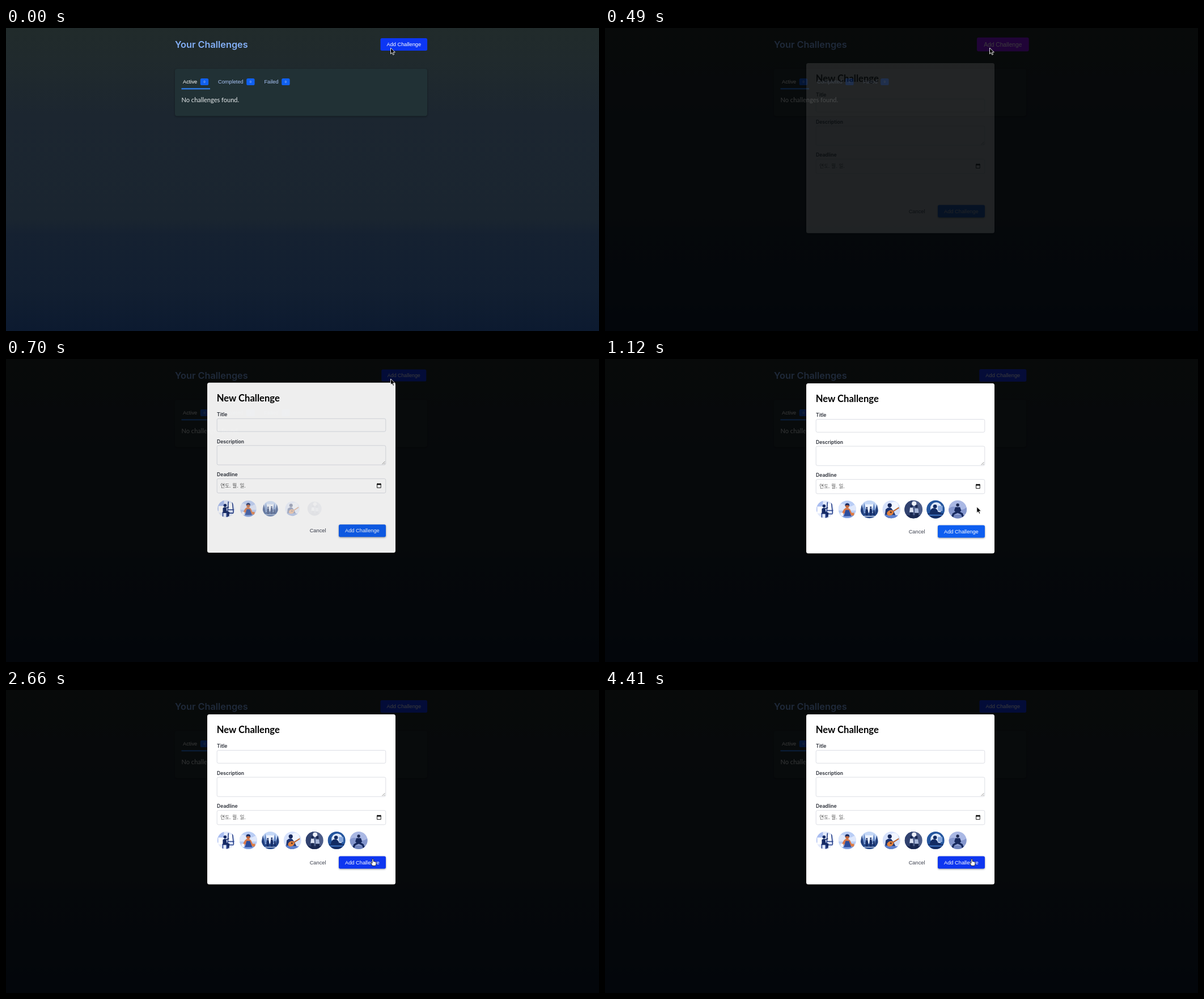
An HTML page for the animation above (4.62 s loop, 1046x535 px).

```html
<!DOCTYPE html>
<html lang="en">
<head>
<meta charset="utf-8">
<title>Your Challenges</title>
<style>
  html, body { margin: 0; width: 100%; height: 100%; overflow: hidden; background: #0c1a2f; }
  svg { display: block; width: 1046px; height: 535px; }
  text { font: 9.25px "Liberation Sans", Arial, sans-serif; white-space: pre; }
  .mid { text-anchor: middle; }
  .round { font: 600 8.65px Inter, sans-serif; fill: #2b2f38; }
  .head { font-size: 16.3px; fill: #84b0f7; }
  .lato { font: 11.05px Lato, sans-serif; fill: #e6eaec; }
  .big { font-size: 16.6px; font-weight: 700; fill: #000; }
  .date text { font: 8.6px "Noto Sans CJK KR", "Noto Sans CJK", sans-serif; fill: #555; }
  .badge { font-size: 5.6px; fill: #c3d3f8; }
  .field rect { fill: #fff0; stroke: #d3d6de; stroke-width: .8; }
  .lift { filter: drop-shadow(0 1px 1.5px #0006); }
</style>
</head>
<body>
<svg viewBox="0 0 1046 535">
  <defs>
    <linearGradient id="sky" x2="0" y2="1">
      <stop offset="0" stop-color="#212b2b"/>
      <stop offset=".11" stop-color="#202a2d"/>
      <stop offset=".29" stop-color="#1c2630"/>
      <stop offset=".63" stop-color="#1a2530"/>
      <stop offset=".68" stop-color="#152131"/>
      <stop offset=".86" stop-color="#121f31"/>
      <stop offset="1" stop-color="#0c1a30"/>
    </linearGradient>
    <clipPath id="disc"><circle r="15.5"/></clipPath>
  </defs>

  <rect width="1046" height="535" fill="url(#sky)"/>
  <text class="round head" x="298" y="34.7">Your Challenges</text>
  <g id="opener">
    <rect id="openerBox" x="-41.3" y="-11" width="82.6" height="22" rx="2.7"/>
    <text class="mid" y="3.2" fill="#fff">Add Challenge</text>
  </g>
  <rect class="lift" x="298" y="72" width="445" height="83.5" rx="4" fill="#213135"/>
  <g id="tabs"></g>
  <rect x="309.5" y="106.2" width="50.5" height="2.2" fill="#2e7ff0"/>
  <text class="lato" x="309.5" y="130.7">No challenges found.</text>

  <rect id="backdrop" width="1046" height="535" fill="#000" opacity=".77"/>

  <g id="modal">
    <rect class="lift" x="355" y="43" width="332" height="300.3" rx="3.5" fill="#fff"/>
    <text class="lato big" x="371.8" y="75.9">New Challenge</text>
    <text class="round" x="372" y="102.2">Title</text>
    <g class="field"><rect x="372.2" y="106.5" width="297.6" height="22.8" rx="2.5"/></g>
    <text class="round" x="372" y="149.8">Description</text>
    <g class="field">
      <rect x="372.2" y="154" width="297.6" height="34.2" rx="2.5"/>
      <path d="M663.5 187l5-5M666.5 187l2-2" stroke="#666" stroke-width=".7"/>
    </g>
    <text class="round" x="372" y="208.4">Deadline</text>
    <g class="field date">
      <rect x="372.2" y="212.6" width="297.6" height="25.2" rx="2.5"/>
      <text x="378.3" y="228.4">연도.</text><text x="399.3" y="228.4">월.</text><text x="412.4" y="228.4">일.</text>
      <path d="M654.6 222h6.6v6.6h-6.6z" fill="none" stroke="#000" stroke-width=".9"/>
      <path d="M654.2 221.3h7.4v2.2h-7.4zM655.5 220.4h1.2v1.5h-1.2zM659.2 220.4h1.2v1.5h-1.2z"/>
    </g>

    <g class="pic">
      <path fill="#e3eafc" d="M-16-16h32v32h-32z"/>
      <path fill="#a9bdf0" d="M-16-16h12v20h-12z"/>
      <path fill="#fff" d="M-14-5h11v12h-11zM3-10h9v11h-9z"/>
      <path fill="none" stroke="#203a86" stroke-width="1.6" d="M4-13l-2 28M11-13l3 28M2 2h12M3 8h11M-7 7h10M-6 7v8M1 7v8"/>
      <path fill="#152a66" d="M-6-1q3-3 6-1l1 6 5 2-1 8h-2l-1-6-8 0z"/>
      <circle cx="-2" cy="-6" r="2.8" fill="#152a66"/>
      <path stroke="#152a66" stroke-width="1.5" d="M-1-1l6-2"/>
    </g>
    <g class="pic">
      <path fill="#b9cdf5" d="M-16-16h32v32h-32z"/>
      <path fill="#dfe8fc" d="M-16-7q7-6 12 0t20-3v12h-32z"/>
      <path fill="#7e9ee0" d="M-16 9h32v7h-32z"/>
      <path fill="#d9784a" d="M-6 0q5-6 11 0l4 9-3 1-3-4v5h-7v-5l-4 4-3-1z"/>
      <path fill="#2c4c9c" d="M-3 1h6l4 11h-13z"/>
      <circle cy="-6" r="3.4" fill="#c4683d"/>
      <path fill="#1c2d62" d="M-4-6q0-5 4-5t4 5q-4-3-8 0z"/>
      <path fill="#f4f6ff" d="M-12 6h5v6h-5z"/>
      <path fill="#e07d44" d="M7 6h5v5h-5z"/>
    </g>
    <g class="pic">
      <path fill="#c4d7f6" d="M-16-16h32v32h-32z"/>
      <path fill="#eef4ff" d="M-7-9h14v14h-14z"/>
      <path fill="#6d8fc9" d="M-9-12l4 18h-8zM8-11l4 16h-8z"/>
      <path fill="#213f7d" d="M-13-9l4 18h-8zM13-9l4 18h-8z"/>
      <path fill="#274a8b" d="M-16 8q16-4 32 0v8h-32z"/>
      <path fill="#172f69" d="M-6-1h3l1 6-1 6h-3l-1-6zM1-2h3l1 6-1 8h-3l-1-7zM7 1h2l1 9h-4z"/>
      <path fill="#172f69" d="M-5.8-4h2.6v2.6h-2.6zM1.2-5h2.6v2.6h-2.6z"/>
      <path stroke="#dce8fb" stroke-width="1" d="M-11 12h22"/>
    </g>
    <g class="pic">
      <path fill="#d6e1fb" d="M-16-16h32v32h-32z"/>
      <circle cx="5" cy="-6" r="7" fill="#f2f6ff"/>
      <path fill="#1d3573" d="M-10 0q5-5 10-2l4 6 4 8-8 4h-12z"/>
      <circle cx="-3" cy="-7" r="3.6" fill="#15265a"/>
      <path fill="#5e80ce" d="M-13 9q14 0 26 2v6h-26z"/>
      <ellipse cx="-2" cy="6" rx="6" ry="4.5" fill="#e0813f" transform="rotate(-25 -2 6)"/>
      <path stroke="#c0622b" stroke-width="2" d="M2 4l11-7"/>
      <circle cx="-1" cy="5" r="1.5" fill="#53302c"/>
    </g>
    <g class="pic">
      <path fill="#4c5c88" d="M-16-16h32v32h-32z"/>
      <path fill="#31426f" d="M-16-16h14v32h-14z"/>
      <circle cx="1" cy="-10" r="4" fill="#edf0f8"/>
      <path fill="#1c2b55" d="M-16 10h32v6h-32z"/>
      <path fill="#dbe2f3" d="M-6-3h5l1 8h-7z"/>
      <path fill="#17264f" d="M-6 5h5v10h-5zM3-3h5l1 9-1 9h-5l-1-9z"/>
      <path fill="#a8b7da" d="M2-2h6l1 8h-7z"/>
      <circle cx="-3.5" cy="-5.5" r="2.4" fill="#192852"/>
      <circle cx="5" cy="-5.5" r="2.4" fill="#192852"/>
    </g>
    <g class="pic">
      <path fill="#24569f" d="M-16-16h32v32h-32z"/>
      <circle cx="1" cy="-2" r="10" fill="#dfe9fb"/>
      <path fill="#88a8dc" d="M4-6h8v9h-8z"/>
      <path fill="#122b63" d="M-10 5q2-8 8-7 5 1 6 6l5 1v2h-19zM-16 7h32v9h-32z"/>
      <circle cx="-1" cy="-5" r="3.3" fill="#122b63"/>
      <path fill="#3f74c2" d="M-12 9h24v2h-24z"/>
    </g>
    <g class="pic">
      <path fill="#aab8e4" d="M-16-16h32v32h-32z"/>
      <path fill="#8496cd" d="M-16-1q8-7 15-1t17-2v12h-32z"/>
      <path fill="#6f83bd" d="M-16 9h32v7h-32z"/>
      <path fill="#17295e" d="M-4-4h8l2 6-2 2 5 3 2 7h-3l-2-5-6-3-6 3-2 5h-3l2-7 5-3-2-2z"/>
      <circle cy="-7.5" r="2.7" fill="#1b2852"/>
    </g>

    <text x="535.7" y="307.7" fill="#3b3f4d">Cancel</text>
    <rect id="submit" class="lift" x="587" y="293.5" width="83" height="22" rx="2.7"/>
    <text class="mid" x="628.4" y="307.7" fill="#fff">Add Challenge</text>
  </g>

  <circle id="ring" cx="647.5" cy="298" r="21.5" fill="none" stroke="#222" stroke-width="1.2" opacity=".6"/>
  <g id="pointer">
    <path id="arrow" d="M0 0V10.8L2.5 8.5 4.3 12.4 6.1 11.6 4.4 7.8H7.8Z" stroke="#fff" stroke-width=".9"/>
    <path id="hand" d="M-1.1 1.2Q-1 0 0 0T1.1 1.2V4.4Q2.2 3.6 2.9 4.8 4 4.2 4.6 5.4 6 5 6 6.6 6 9.6 4.9 12H-.8Q-1.6 10-3.2 8-3.6 6.6-2.4 6.7L-1.1 7.8Z" fill="#fff" stroke="#000" stroke-width=".8"/>
  </g>
</svg>
<script>
const LOOP = 4620, STEP = 70, CLICKS = [2170, 3990], PRESS = 140;
const $ = id => document.getElementById(id);
const all = sel => [...document.querySelectorAll(sel)];
const clamp = v => Math.max(0, Math.min(1, v));
const show = (id, on) => $(id).setAttribute('visibility', on ? 'visible' : 'hidden');
const move = (el, x, y, s = 1) => el.setAttribute('transform', `translate(${x} ${y}) scale(${s})`);
const mix = (a, b, p) => `rgb(${a.map((v, i) => Math.round(v + (b[i] - v) * p))})`;
const fade = (ms, length) => Math.sin(clamp(ms / length) * Math.PI / 2);

// Damped spring from 0 to 1; w is the natural frequency, z the damping ratio
function spring(ms, w, z) {
  if (ms <= 0) return 0;
  const t = ms / 1000, r = Math.sqrt(1 - z * z), a = w * r * t;
  return 1 - Math.exp(-z * w * t) * (Math.cos(a) + z / r * Math.sin(a));
}

$('tabs').innerHTML = [['Active', 312, 350, '#fff'], ['Completed', 374, 431.4, '#a9c4f7'], ['Failed', 455.4, 493.4, '#a9c4f7']]
  .map(([name, x, bx, color]) => `<text x="${x}" y="98.2" fill="${color}">${name}</text>
    <rect x="${bx - 7.2}" y="89" width="14.4" height="12" rx="2.6" fill="#1060f0"/>
    <text class="mid badge" x="${bx}" y="97">0</text>`).join('');

const pics = all('.pic'), fields = all('.field');
pics.forEach(p => p.setAttribute('clip-path', 'url(#disc)'));

const PATH = [[930, 678.5, 35], [1120, 655.8, 261], [1450, 649, 299], [1900, 647, 298.3]];
function pointerAt(t) {
  const i = PATH.findIndex(k => k[0] > t);
  if (i < 1) return PATH[i ? PATH.length - 1 : 0].slice(1);
  const [t0, x0, y0] = PATH[i - 1], [t1, x1, y1] = PATH[i];
  const u = (t - t0) / (t1 - t0), p = u * u * (3 - 2 * u);
  return [x0 + (x1 - x0) * p, y0 + (y1 - y0) * p];
}

function draw(t) {
  const hover = spring(t - 400, 22.36, .2236) - spring(t - 500, 22.36, .2236);
  move($('opener'), 701.8, 29, 1 + .1 * hover);
  $('openerBox').setAttribute('fill', mix([12, 54, 244], [139, 17, 240], clamp(hover)));

  show('backdrop', t >= 470);
  $('modal').setAttribute('opacity', fade(t - 470, 300));
  move($('modal'), 0, 20.7 * (1 - spring(t - 470, 22.36, .559)));
  pics.forEach((pic, i) => {
    const ms = t - 490 - 50 * i;
    move(pic, 388.4 + 38.95 * i, 265.5, .8 + .2 * spring(ms, 10, .5));
    pic.setAttribute('opacity', fade(ms, 250));
  });
  $('submit').setAttribute('fill', mix([14, 94, 240], [14, 54, 240], clamp((t - 1350) / 100)));

  // Empty fields jump left after a click and spring back one after another
  const release = CLICKS.map(c => c + PRESS).filter(c => c <= t).pop();
  fields.forEach((field, i) => {
    const x = release ? -6.9 * (1 - spring(t - release - 50 * i, 40, .75)) : 0;
    move(field, x, 0);
  });

  move($('pointer'), ...pointerAt(t));
  show('arrow', t < 1350);
  show('hand', t >= 1350);
  show('ring', CLICKS.some(c => t >= c && t < c + PRESS));
}

function tick() {
  const t = performance.now() % LOOP;
  draw(Math.floor(t / STEP) * STEP);
  requestAnimationFrame(tick);
}
tick();
</script>
</body>
</html>
```
